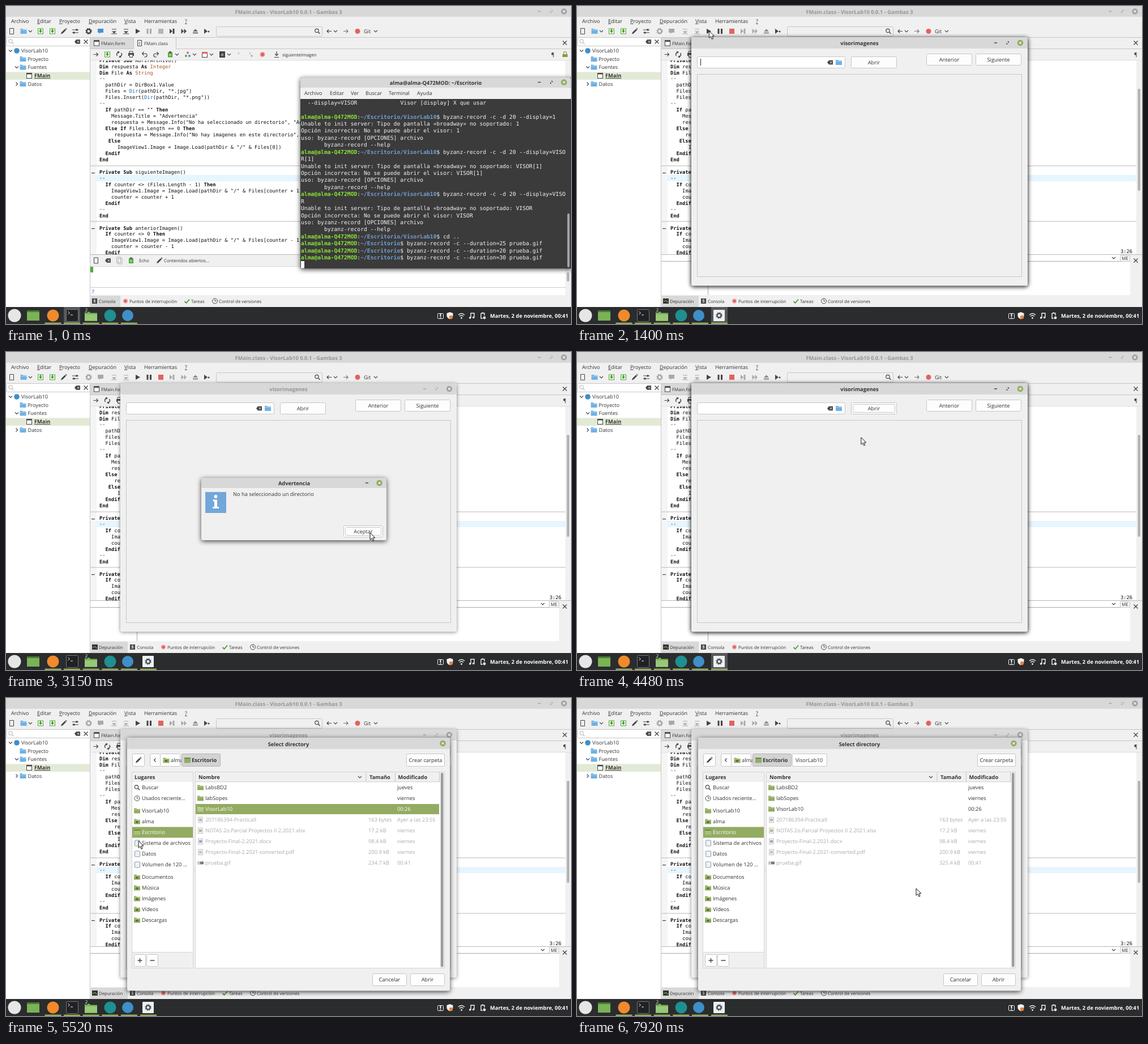
These frames come from a looping animation (998x561 px, 8 s). An HTML page:

```html
<!DOCTYPE html>
<html lang="es">
<head>
<meta charset="utf-8">
<title>visorimagenes</title>
<style>
html,body{margin:0;width:100%;height:100%;overflow:hidden;background:#f0f0f0}
svg{display:block;width:998px;height:561px}
text{font:9.1px "Open Sans",sans-serif;fill:#333;text-rendering:geometricPrecision}
.s{font-size:7.85px}
.d{font-size:9.3px}
.b{font-size:9.3px;font-weight:700}
.c{text-anchor:middle}
.dim{fill:#a8aaa8}
.gr{fill:#969696}
.w{fill:#fff}
.m{font:8.767px "DejaVu Sans Mono",monospace;fill:#111}
.t{font:9.71px "DejaVu Sans Mono",monospace;fill:#f2f2f2}
.k{font-weight:700}
.ty{fill:#b0531f}
.fn{fill:#1769b5}
.pu{font-weight:700;fill:#8ae234}
.pd{font-weight:700;fill:#729fcf}
.u{text-decoration:underline}
.sh{filter:drop-shadow(0 2px 4px #000b)}
.sh2{filter:drop-shadow(0 1px 3px #0007)}
.a{animation:8s step-end infinite}
.term{animation-name:term}
.idle{animation-name:idle}
.run{animation-name:run}
.hover{animation-name:hover}
.focus{animation-name:focus}
.caret{animation-name:caret}
.ring{animation-name:ring}
.pick{animation-name:pick}
.press{animation-name:press}
.v1{animation-name:v1}
.v2{animation-name:v2}
.v3{animation-name:v3}
.zoom{transform-box:fill-box;transform-origin:center;animation:8s linear infinite}
.win{animation-name:win}
.msg{animation-name:msg}
.dlg{animation-name:dlg}
#ptr{animation:ptr 8s linear infinite}
@keyframes term{0%{opacity:1}13.375%,to{opacity:0}}
@keyframes idle{0%{opacity:1}14.375%,to{opacity:0}}
@keyframes run{0%{opacity:0}14.375%,to{opacity:1}}
@keyframes hover{0%{opacity:0}11%{opacity:1}14.375%,to{opacity:0}}
@keyframes focus{0%{opacity:0}15.4%{opacity:1}30%{opacity:0}52.5%{opacity:1}65%,to{opacity:0}}
@keyframes caret{0%{opacity:0}15.4%{opacity:1}22.3%,to{opacity:0}}
@keyframes ring{0%{opacity:0}52.5%{opacity:1}62%,to{opacity:0}}
@keyframes pick{0%{opacity:0}62%{opacity:1}65%,to{opacity:0}}
@keyframes press{0%{opacity:0}50%{opacity:1}51.75%,to{opacity:0}}
@keyframes v1{0%{opacity:1}84.75%,to{opacity:0}}
@keyframes v2{0%{opacity:0}84.75%{opacity:1}93.625%,to{opacity:0}}
@keyframes v3{0%{opacity:0}93.625%,to{opacity:1}}
@keyframes win{0%,15.4%{opacity:0;transform:scale(.9)}16.9%,to{opacity:1;transform:none}}
@keyframes msg{0%,30%{opacity:0;transform:scale(.9)}31.5%,51.9%{opacity:1;transform:none}53%,to{opacity:0;transform:scale(.9)}}
@keyframes dlg{0%,65%{opacity:0;transform:scale(.9)}67%,to{opacity:1;transform:none}}
@keyframes ptr{
0%,1.87%{opacity:0;transform:translate(938px,448px)}
1.875%{opacity:1;transform:translate(938px,448px);animation-timing-function:ease-out}
7.375%,9.75%{transform:translate(245px,48px)}
11%,17.5%{transform:translate(233px,44px)}
23%{transform:translate(440px,105px)}
26.375%,32.5%{transform:translate(531px,94px)}
38.375%{transform:translate(633px,315px)}
39.375%,52%{transform:translate(643px,319px)}
56%{transform:translate(502px,151px)}
58.625%,64.5%{transform:translate(462px,97px)}
69%{transform:translate(233px,252px)}
74%,78.375%{transform:translate(655px,281px);animation-timing-function:ease-in-out}
83%,84.75%{transform:translate(240px,199px)}
85.375%,86.25%{transform:translate(248px,200px)}
87.75%,90.5%{transform:translate(247px,218px)}
91.5%,93.7%{transform:translate(255px,236px)}
99%,to{opacity:1;transform:translate(599px,336px)}
}
</style>
</head>
<body>
<svg viewBox="0 0 998 561"></svg>
<script>
const GREEN = '#93ab62', BAR = '#d8d8d8', BG = '#f0f0f0', LINE = '#c6c6c6', INK = '#444', BLUE = '#6fb1e4', RED = '#e3625f';
const USER = 'alma', HOST = 'alma-Q472MOD';

// drawing helpers; text is placed by its vertical centre
const esc = s => s.replace(/&/g, '&amp;').replace(/</g, '&lt;').replace(/>/g, '&gt;');
const T = (x, y, s, cls = '') => `<text x="${x}" y="${y + 3.2}" class="${cls}">${s}</text>`;
const R = (x, y, x2, y2, fill, more = '') => `<rect x="${x}" y="${y}" width="${x2 - x}" height="${y2 - y}" fill="${fill}" ${more}/>`;
const box = (x, y, x2, y2, fill = '#fff', edge = LINE, r = 2) => R(x + .5, y + .5, x2 - .5, y2 - .5, fill, `stroke="${edge}" rx="${r}"`);
const C = (x, y, r, fill, more = '') => `<circle cx="${x}" cy="${y}" r="${r}" fill="${fill}" ${more}/>`;
const L = (d, col = INK, w = 1.2) => `<path d="${d}" fill="none" stroke="${col}" stroke-width="${w}"/>`;
const F = (d, col = INK) => `<path d="${d}" fill="${col}"/>`;
const at = (x, y, s) => `<g transform="translate(${x} ${y})">${s}</g>`;
const G = (cls, s) => `<g class="${cls}">${s}</g>`;
const btn = (x, y, x2, y2, label, fill = '#fdfdfd') => box(x, y, x2, y2, fill) + T((x + x2) / 2, (y + y2) / 2, label, 'd c');

// icons
const chev = (x, y, c = INK) => L(`M${x - 3} ${y - 1.5}l3 3l3-3`, c, 1.1);
const chevR = (x, y) => L(`M${x - 1.5} ${y - 3}l3 3l-3 3`, INK, 1.1);
const cross = (x, y, r = 3.5, c = INK, w = 1.3) => L(`M${x - r} ${y - r}l${2 * r} ${2 * r}m0 ${-2 * r}l${-2 * r} ${2 * r}`, c, w);
const folder = (x, y, c = GREEN) => at(x, y, F('M-5.5-4.5h4l1 1.3h6v7.7h-11z', c) + L('M-5.5-2h11', '#ffffff80', .8));
const save = (x, y) => at(x, y, box(-5, -5, 5, 5, '#e9f7df', '#58a83c', 0) + F('M-1-4h2v3h2l-3 4l-3-4h2z', '#3f9a2a'));
const doc = (x, y, c = INK) => at(x, y, L('M-3.5-5h7v10h-7z', c, 1));
const clip = (x, y) => at(x, y, R(-4, -4, 4, 5, '#55a83c') + R(-2, -5.5, 2, -3, '#555') + L('M-2 0h4m-4 2h4', '#fff', .8));
const lens = (x, y, c = INK) => C(x - 1, y - 1, 3.2, 'none', `stroke="${c}" stroke-width="1.2"`) + L(`M${x + 1.5} ${y + 1.5}l3 3`, c, 1.4);
const clear = (x, y) => at(x, y, F('M-5 0l3-3.7h7v7.4h-7z') + cross(1.5, 0, 1.7, '#fff', 1));
const pencil = (x, y) => at(x, y, F('M-5 5l1-3l6-6l2 2l-6 6z') + F('M2.7-4.7l1-1l2 2l-1 1z'));
const gear = (x, y, c, hole) => C(x, y, 3.5, 'none', `stroke="${c}" stroke-width="2.4"`) + C(x, y, 4.8, 'none', `stroke="${c}" stroke-width="1.8" stroke-dasharray="1.9 1.87"`) + C(x, y, 1.5, hole);
const form = (x, y) => box(x - 5, y - 5, x + 5, y + 5, '#fff', INK, 0) + R(x - 5, y - 5, x + 5, y - 2.5, INK);
const clock = (x, y, r = 4.5) => C(x, y, r, 'none', `stroke="${INK}"`) + L(`M${x} ${y - r + 1.5}v${r - 1.5}h2.4`, INK, 1);
const bars = (x, y, c) => L(`M${x - 5} ${y + 4.5}h10`, c, 1) + F(`M${x - 4} ${y}h8l-4 4z`, c) + L(`M${x - 4} ${y - 3.5}h8`, c, 1);
const ctl = (x, y, fill, c) => L(`M${x - 46} ${y}h5`, c, 1.5) + F(`M${x - 20} ${y - 2.5}v3l-3-3zM${x - 24.5} ${y + 2.5}v-3l3 3z`, c) + C(x, y, 5.2, fill) + cross(x, y, 1.9, '#fff', 1.1);

const code = `Private Sub AbrirArchivo()
Dim respuesta As Integer
Dim File As String
··
  pathDir = DirBox1.Value
  Files = Dir(pathDir, "*.jpg")
  Files.Insert(Dir(pathDir, "*.png"))
··
  If pathDir == "" Then
    Message.Title = "Advertencia"
    respuesta = Message.Info("No ha seleccionado un directorio", "Aceptar")
  Else If Files.Length == 0 Then
     respuesta = Message.Info("No hay imagenes en este directorio", "Aceptar")
   Else
      ImageView1.Image = Image.Load(pathDir & "/" & Files[0])
  Endif
End

Private Sub siguienteImagen()
··
  If counter <> (Files.Length - 1) Then
    ImageView1.Image = Image.Load(pathDir & "/" & Files[counter + 1])
    counter = counter + 1
  Endif
··
End

Private Sub anteriorImagen()
  If counter <> 0 Then
    ImageView1.Image = Image.Load(pathDir & "/" & Files[counter - 1])
    counter = counter - 1
  Endif`.split('\n');

const paint = s => esc(s)
  .replace(/\b(Private|Sub|Dim|As|If|Then|Else|Endif|End)\b/g, '<tspan class="k">$1</tspan>')
  .replace(/\b(Integer|String)\b/g, '<tspan class="ty">$1</tspan>')
  .replace(/\bDir(?=\()/g, '<tspan class="fn">Dir</tspan>');

function editor() {
  let s = R(149, 96, 988, 438, '#fff') + R(149, 96, 160, 438, '#f5f5f5') + R(160, 298, 988, 309, '#e6f5fe');
  for (const y of [282, 380]) s += R(149, y - .5, 988, y + .5, '#b9b9b9') + R(151, y + 12, 157, y + 13.2, INK);
  code.forEach((line, i) => {
    const pad = line.search(/\S|$/);
    s += T(165 + pad * 5.278, 95.4 + i * 10.96, paint(line.trim()), line === '··' ? 'm dim' : 'm');
  });
  return s + R(988, 96, 998, 438, BG) + R(990.5, 146, 995, 326, '#b3b3b3', 'rx="2"');
}

function editBar() {
  const reload = L('M196.5 88a4 4 0 0 1 2-6.5M203.5 83a4 4 0 0 1-2 6.5', INK, 1.5) + F('M197 79.5l4 1.5l-3 3zM203 91.5l-4-1.5l3-3z');
  const printer = F('M216 83h10v5h-2v-2h-6v2h-2z') + L('M218 83v-3h6v3M218.5 87v3.5h5V87', INK, 1);
  const undo = L('M241 84h5a3 3 0 0 1 0 6h-2M243.5 81l-3 3l3 3');
  const redo = L('M269 84h-5a3 3 0 0 0 0 6h2M266.5 81l3 3l-3 3');
  return reload + printer + undo + redo + clip(290, 85.5) + chev(302, 85.5) +
    C(321, 82.5, 2, RED) + C(318, 88, 2, '#58a83c') + C(324, 88, 2, '#4b91d0') + chev(333, 85.5) +
    box(346, 81, 356, 91, '#fff', INK, 0) + R(346, 81, 356, 84, RED) + chev(363, 85.5) +
    R(377, 80, 387, 91, INK) + T(382, 85, 'a', 's c w') + chev(394, 85.5) + T(410, 86, "'") + T(430, 86, "'") +
    cross(434, 88, 1.5, RED, 1) + C(453, 85.5, 4, RED, 'stroke="#f3b3b1" stroke-width="1.5"') +
    L('M478 80v7M475 84.5l3 3l3-3M474 90.5h8') + T(488, 85.5, 'siguienteImagen', 's');
}

const tabs = dx => at(dx, 0, box(152, 516, 161, 525, '#555', '#333', 0) + T(156.5, 520, '$', 's c w') + T(164, 520.7, 'Consola', 's') +
  C(211, 520.5, 3.5, RED, 'stroke="#f3b3b1" stroke-width="1.5"') + T(218, 520.7, 'Puntos de interrupción', 's') +
  L('M315.5 521l3 3l5.5-6.5', '#4c9c35', 1.8) + T(327, 520.7, 'Tareas', 's') + clock(369, 520.5) + T(376, 520.7, 'Control de versiones', 's'));

function toolbarRun(on) {
  const off = '#a9a9a9', a = on ? off : INK, b = on ? INK : off;
  return gear(146, 44.5, a, BG) + F('M162 40h10v7h-5l-2 2.5v-2.5h-3z', on ? off : '#4b91d0') + bars(191, 44.5, a) + bars(212, 44.5, a) +
    F('M229 40l8 4.5l-8 4.5z') + F('M248.5 40h3v9h-3zM254 40h3v9h-3z', b) + R(269, 40, 278, 49, on ? RED : '#b5b5b5') +
    F('M289 40l5 4.5l-5 4.5zM294.5 40h3v9h-3z', a) + F('M309.5 40l4.5 4.5l-4.5 4.5zM314.5 40l4.5 4.5l-4.5 4.5z', a) +
    F('M330 45l4.5-4.5l4.5 4.5zM330 46.5h9v2h-9z', on ? '#888' : '#666') + F('M350 40l6 4.5l-6 4.5z') + C(358, 45, 1.5, INK);
}

function ide() {
  const menus = [[9, 'Archivo', 0], [55, 'Editar', 1], [94, 'Proyecto', 1], [146, 'Depuración', 1], [209, 'Vista', 1], [244, 'Herramientas', 0], [316, '?', 1]];
  let s = editor() + R(0, 0, 998, 96, BG) + R(0, 0, 998, 19, BAR) + T(499, 10.5, 'FMain.class - VisorLab10 0.0.1 - Gambas 3', 'b c gr') + ctl(985.5, 9.5, '#a3a3a3', '#a3a3a3');
  for (const [x, m, u] of menus) s += T(x, 26.7, u ? `<tspan class="u">${m[0]}</tspan>${m.slice(1)}` : m);
  s += doc(10, 44.5) + folder(31, 44.5, BLUE) + chev(43, 44.5) + save(61, 44.5) + save(82, 44.5) + pencil(102, 44.5) +
    L('M117 42h11M117 47h11') + C(125, 42, 1.8, INK) + C(120, 47, 1.8, INK) +
    box(371, 36, 559, 54, BG) + lens(550, 44.5) + L('M575 44.5h-8m3-3l-3 3l3 3') + chev(582, 44.5) + L('M596 44.5h8m-3-3l3 3l-3 3', '#777') +
    C(621, 44.5, 4.5, RED) + T(632, 44.7, 'Git') + chev(653, 44.5) +
    G('a hover', box(223, 34, 243, 55, '#fafafa')) + G('a idle', toolbarRun(0)) + G('a run', toolbarRun(1));
  // project tree
  s += R(0, 55, 148, 531, '#fff') + box(0, 55, 149, 71) + lens(9, 63, '#c2c2c2') + clear(126, 63) + cross(141, 63) + R(148, 55, 149, 531, LINE) +
    R(0, 116.5, 148, 130, '#e2ead6') + chev(8, 79) + C(19, 79, 4.8, '#3f8fc8') + T(27, 79, 'VisorLab10') + folder(30, 93.6, BLUE) + T(38, 93.6, 'Proyecto') +
    chev(19, 108) + folder(30, 108, BLUE) + T(38.5, 108, 'Fuentes') + form(41, 123) + T(50, 123, 'FMain', 'b u') + chevR(19, 137.5) + folder(30, 137.5, BLUE) + T(38.5, 137.5, 'Datos');
  // file tabs and editor tools
  s += R(149, 55, 998, 56, LINE) + R(149, 56, 225, 75, '#d9d9d9') + R(149, 75, 998, 76, LINE) + box(225, 55, 301, 76, BG, LINE, 0) + R(226, 74, 300, 77, BG) +
    form(160, 65.5) + T(168, 65.3, 'FMain.form', 's') + doc(236, 65.5) + T(236, 65, 'c', 's c') + T(244, 65.3, 'FMain.class', 's') + cross(987, 65) +
    L('M154.500 85.500h8m-3-3l3 3l-3 3') + G('a idle', save(179, 85.5) + editBar() + T(963, 85.5, '¶') + R(983, 85, 992, 90, '#8a9a3c') + L('M985 85v-2a2.500 2.500 0 0 1 5 0v2', '#8a9a3c')) +
    G('a run', at(-21, 0, editBar()) + T(984, 85.5, '¶')) + R(149, 95.5, 998, 96.2, '#d4d4d4');
  // bottom panel
  s += R(149, 438, 998, 531, BG) + R(149, 438, 998, 439, '#b9b9b9');
  s += G('a idle', doc(159, 449) + clear(180, 449) + doc(199, 448, '#b5b5b5') + doc(201.5, 450, '#b5b5b5') + clip(221, 449) + T(235, 448.7, 'Echo', 's') + pencil(271, 449) + T(279, 448.7, 'Contenidos abiertos...', 's') +
    R(149, 459, 988, 510, '#fff') + R(149, 459, 988, 459.7, LINE) + R(149, 460, 154, 470, '#58a83c') + R(149, 496, 988, 497, '#ccc') + T(151, 503.5, '?', 'm fn') + R(990.5, 470, 995, 486, '#b3b3b3', 'rx="2"') +
    R(150, 511, 202, 531, BAR) + tabs(0));
  s += G('a run', T(960, 432.8, '3:26', 'm') + R(149, 439, 977, 510, '#fff') + R(149, 450, 977, 451, '#aaa') + chev(948, 444.5) + box(959, 439, 977, 451, '#f4f4f4') + T(968, 445, 'ME', 's c') + cross(987, 449) +
    R(231, 450, 232, 510, '#aaa') + R(150, 511, 215, 531, BAR) + R(152, 516, 162, 525, '#333') + L('M153 521h2l2-2l2 3h2', '#8bcf5a', 1) + T(164, 520.7, 'Depuración', 's') + tabs(67));
  return s;
}

function taskbar() {
  let s = R(0, 531, 998, 561, '#2b2c2e') + G('a term', R(102, 531, 131, 561, '#55575a'));
  s += C(15, 546, 11.5, '#e6e6e6') + R(37, 537, 59, 555, '#79b356') + R(37, 537, 59, 540, '#4c7a34') + C(83, 546, 10.5, '#f08a2c') +
    box(106, 535, 128, 557, '#202124', '#777') + L('M109.500 539l3 2.500l-3 2.500M114 545h4', '#eee', 1) +
    at(150, 547, F('M-11-8h8l2 2.500h12v14h-22z', '#79b356') + R(-11, -3, 11, 8.5, '#98c878')) + C(142, 536, 5, '#2b2c2e') + T(142, 536, '2', 's c w') +
    C(184, 546, 10.5, '#1f8f92') + C(215, 546, 10, '#3f8fc8');
  for (let i = 0; i < 5; i++) s += R(68.5 + i * 33.6, 558.5, 97.5 + i * 33.6, 561, GREEN);
  s += G('a focus', R(237, 531, 266, 561, '#55575a')) + G('a run', R(241, 536, 261, 556, '#eef0f2', 'rx="1"') + gear(251, 546, '#4a5560', '#eef0f2') + R(237, 558.5, 266, 561, GREEN));
  const w = '#f2f2f2';
  return s + box(762, 542, 773, 552, 'none', w, 1) + F('M766.500 543h2v5h-2zM766.500 549h2v1.500h-2z', w) +
    F('M784 540l5.500 2v4q0 4-5.500 6.500q-5.500-2.500-5.500-6.500v-4z', w) + C(786, 549, 3.2, '#e8833a') +
    L('M799 545q5.500-5 11 0M801 547.500q3.500-3 7 0', w, 1.5) + C(804.5, 550.5, 1.4, w) +
    L('M821 550v-8h6v7', w, 1.4) + C(819.7, 550, 1.8, w) + C(825.7, 549.5, 1.8, w) +
    L('M839 542h6v4M839 542v9h3', w, 1.4) + R(841, 540.5, 843, 542, w) + C(845, 550, 2.4, w) + T(855, 546.7, 'Martes, 2 de noviembre, 00:41', 'b w');
}

function terminal() {
  const prompt = (dir, cmd) => `<tspan class="pu">${USER}@${HOST}</tspan>:<tspan class="pd">~/Escritorio${dir}</tspan>$ ${cmd}`;
  const lab = cmd => prompt('/VisorLab10', cmd);
  const fail = v => ['Unable to init server: Tipo de pantalla «broadway» no soportado: ' + v,
    'Opción incorrecta: No se puede abrir el visor: ' + v, 'uso: byzanz-record [OPCIONES] archivo', '       byzanz-record --help'];
  const rec = 'byzanz-record -c -d 20 --display=';
  const lines = ['  --display=VISOR', '', lab(rec + 1), ...fail('1'), lab(rec + 'VISO'), 'R[1]', ...fail('VISOR[1]'),
    lab(rec + 'VISO'), 'R', ...fail('VISOR'), lab('cd ..'), ...[25, 20, 30].map(n => prompt('', `byzanz-record -c --duration=${n} prueba.gif`))];
  let s = R(520, 126, 1000, 463, '#3b3b3b', 'class="sh" rx="3"') + R(520, 126, 998, 145, BAR, 'rx="3"') + R(520, 144, 998, 164, BG) +
    T(759, 135.5, `${USER}@${HOST}: ~/Escritorio`, 'b c') + ctl(985.5, 134.5, GREEN, INK);
  [[527, 'Archivo'], [572, 'Editar'], [609, 'Ver'], [635, 'Buscar'], [676, 'Terminal'], [726, 'Ayuda']].forEach(([x, m]) => s += T(x, 153.7, m));
  lines.forEach((line, i) => s += T(521 + line.search(/\S|$/) * 5.845, 170.6 + i * 12.42, line.trim(), 't'));
  return s + T(696.5, 170.6, 'Visor [display] X que usar', 't') + R(521, 450, 527, 462.5, '#fff') + R(991.5, 366, 995.5, 461, '#a6a6a6', 'rx="2"');
}

function viewer() {
  const title = (fill, c, cls) => R(202, 55, 796, 75, BAR, 'rx="3"') + T(499, 66, 'visorimagenes', 'b c ' + cls) + ctl(783, 65, fill, c);
  return G('a focus', R(202, 55, 796, 493, BG, 'class="sh" rx="3"')) + R(202, 55, 796, 493.5, BG, 'class="sh2" rx="3"') + title('#a3a3a3', '#a3a3a3', 'gr') + G('a focus', title(GREEN, INK, '')) +
    box(212, 89, 474, 110) + G('a caret', R(218, 93, 219, 105, '#222')) + clear(447, 99.5) + G('a pick', R(456, 93, 469, 106, '#dcdcdc')) + folder(462.5, 99.5, BLUE) +
    btn(484, 89, 565, 110, 'Abrir') + G('a ring', box(487, 92, 562, 107, 'none')) + btn(617, 84, 698, 105, 'Anterior') + btn(704, 84, 785, 105, 'Siguiente') + box(212, 120, 786, 478, 'none', LINE, 0);
}

function message() {
  const ok = fill => btn(596, 306, 666, 327, '', fill) + box(599, 309, 663, 324, 'none') + T(631, 316.5, 'Aceptar', 'd c');
  return R(345, 222, 672, 332, BG, 'class="sh" rx="3"') + R(345, 222, 672, 240, BAR, 'rx="3"') + T(509, 231.5, 'Advertencia', 'b c') +
    L('M635 231h5', INK, 1.5) + C(659.5, 231, 5.2, GREEN) + cross(659.5, 231, 1.9, '#fff', 1.1) + R(352, 247, 389, 284, '#72a7da') +
    C(370.5, 255, 2.9, '#fff') + F('M365.500 260.500h7.500v12.500h3v3h-11v-3h3v-9.500h-2.500z', '#fff') + T(401, 251, 'No ha seleccionado un directorio', 'd') +
    ok('#fdfdfd') + G('a press', ok('#d6d6d6'));
}

const places = [['Buscar', 158], ['Usados reciente…', 177], ['VisorLab10', 199], [USER, 218], ['Escritorio', 237], ['Sistema de archivos', 256], ['Datos', 275],
  ['Volumen de 120 …', 294], ['Documentos', 316], ['Música', 335], ['Imágenes', 354], ['Vídeos', 373], ['Descargas', 392]];
const desk = (x, y, c = GREEN) => R(x - 5.5, y - 4.5, x + 5.5, y + 4.5, c) + R(x - 5.5, y - 4.5, x + 5.5, y - 3, '#5d7a35');
const sheet = (x, y, c) => R(x - 4, y - 5, x + 4, y + 5, '#ececec', 'stroke="#bbb" stroke-width=".7"') + R(x - 2.5, y - 2, x + 2.5, y + 2, c);

// one directory listing: selected place, path buttons, column positions and rows
function listing(cls, here, crumbs, [chevX, sizeX, dateX], rows, pick) {
  let s = '';
  places.forEach(([name, y], i) => {
    const on = i === here;
    if (on) s += R(223, y - 9.5, 330, y + 9.5, GREEN);
    s += i === 0 ? lens(231.5, 158) : i === 1 ? clock(231.5, 177) : i === 4 ? desk(231.5, y, on ? '#a9c07a' : GREEN) :
      i > 4 && i < 8 ? box(227, y - 5.5, 237, y + 5.5, '#eef2f5', '#8c9aa5', 1) : folder(231.5, y, on ? '#b4c98b' : GREEN) + (i === 2 ? '' : R(229.5, y - 1, 233.5, y + 2.5, '#55702f'));
    s += T(240, y, name, 'd' + (on ? ' w' : ''));
  });
  [[272, 308, USER, 291], [310, 379, 'Escritorio', 330], [380, 442, 'VisorLab10', 386]].slice(0, crumbs[0]).forEach(([x, x2, name, tx], i) => {
    const on = i === crumbs[1];
    s += box(x, 98, x2, 121, on ? '#d3d3d3' : '#fdfdfd', on ? '#b3b3b3' : LINE) + T(on ? tx - 2 : tx, 110, name, on ? 'b' : 'd');
  });
  s += folder(283, 110) + R(281, 109, 285, 112.5, '#55702f') + desk(320.5, 110);
  s += T(340, 140, 'Nombre', 'b') + chev(chevX, 139.5) + R(chevX + 10.5, 131, chevX + 11.5, 148, LINE) + T(sizeX + 2, 140, 'Tamaño', 'b') + R(dateX - 4, 131, dateX - 3, 148, LINE) + T(dateX + 1.5, 140, 'Modificado', 'b');
  rows.forEach(([name, date, size, c], i) => {
    const y = 158 + i * 19, on = i === pick, k = on ? 'd w' : size ? 'd dim' : 'd';
    if (on) s += R(335, y - 9, 765, y + 9, GREEN);
    s += (!size ? folder(343.5, y, on ? '#b4c98b' : GREEN) : c ? sheet(343.5, y, c) : R(338, y - 3, 349, y + 3, '#c9c9c9') + R(343, y - 2, 349, y + 2, '#777')) +
      T(352, y, name, k) + T(sizeX, y, size || '', k) + T(dateX, y, date, k);
  });
  return G('a ' + cls, s);
}

function chooser() {
  const files = kb => [['LabsBD2', 'jueves'], ['labSopes', 'viernes'], ['VisorLab10', '00:26'], ['207186394-Practica9', 'Ayer a las 23:55', '163 bytes', '#b5b5b5'],
    ['NOTAS 2o.Parcial Proyectos II 2.2021.xlsx', 'viernes', '17.2 kB', '#a9bd86'], ['Proyecto-Final-2.2021.docx', 'viernes', '98.4 kB', '#8fa6c4'],
    ['Proyecto-Final-2.2021-converted.pdf', 'viernes', '200.9 kB', '#c4c4c4'], ['prueba.gif', '00:41', kb + ' kB']];
  const wide = [625, 640, 691];
  return R(214, 70, 784, 516.5, BG, 'class="sh" rx="3"') + R(214, 70, 784, 90, BAR, 'rx="3"') + T(499, 81.5, 'Select directory', 'b c') + C(771.5, 80, 5.2, GREEN) + cross(771.5, 80, 1.9, '#fff', 1.1) +
    btn(223, 98, 245, 121, '') + pencil(234, 109.5) + btn(254, 98, 273, 121, '') + L('M264.500 106.500l-3 3l3 3') + btn(707, 98, 775, 121, 'Crear carpeta') +
    box(222, 130, 331, 477, BG, '#d5d5d5', 0) + R(223, 148, 330, 448.5, '#fff') + T(227, 140, 'Lugares', 'b') + R(223, 448, 330, 449, '#d5d5d5') +
    btn(226, 452, 247, 474, '') + btn(248, 452, 269, 474, '') + L('M232.500 463h8m-4-4v8M254.500 463h8', INK, 1.4) +
    [299, 303, 307].map(y => C(332.5, y, .6, '#999')).join('') +
    box(334, 130, 775, 477, BG, '#d5d5d5', 0) + R(335, 148, 766, 476, '#fff') + R(335, 147.5, 766, 148.3, LINE) + R(765, 131, 766, 148, LINE) + R(768, 132, 772.5, 474.5, '#9b9b9b', 'rx="2"') +
    btn(647, 486, 708, 508, 'Cancelar') + btn(714, 486, 775, 508, 'Abrir') +
    listing('v1', 4, [2, 1], wide, files('234.7'), 2) +
    listing('v2', 2, [3, 2], [634, 649, 695], [['ImagenesPrograma', '00:40'], ['README.md', '00:24', '11 bytes', '#bdbdbd']]) +
    listing('v3', 4, [3, 1], wide, files('325.4'));
}

document.querySelector('svg').innerHTML = ide() + G('a term', terminal()) + taskbar() +
  G('zoom win', viewer()) + G('zoom msg', message()) + G('zoom dlg', chooser()) +
  '<path id="ptr" d="M0 0V12.300L2.900 9.600L4.900 14.300L7 13.400L5 8.900H9z" fill="#fff" stroke="#111" stroke-linejoin="round"/>';
</script>
</body>
</html>
```
